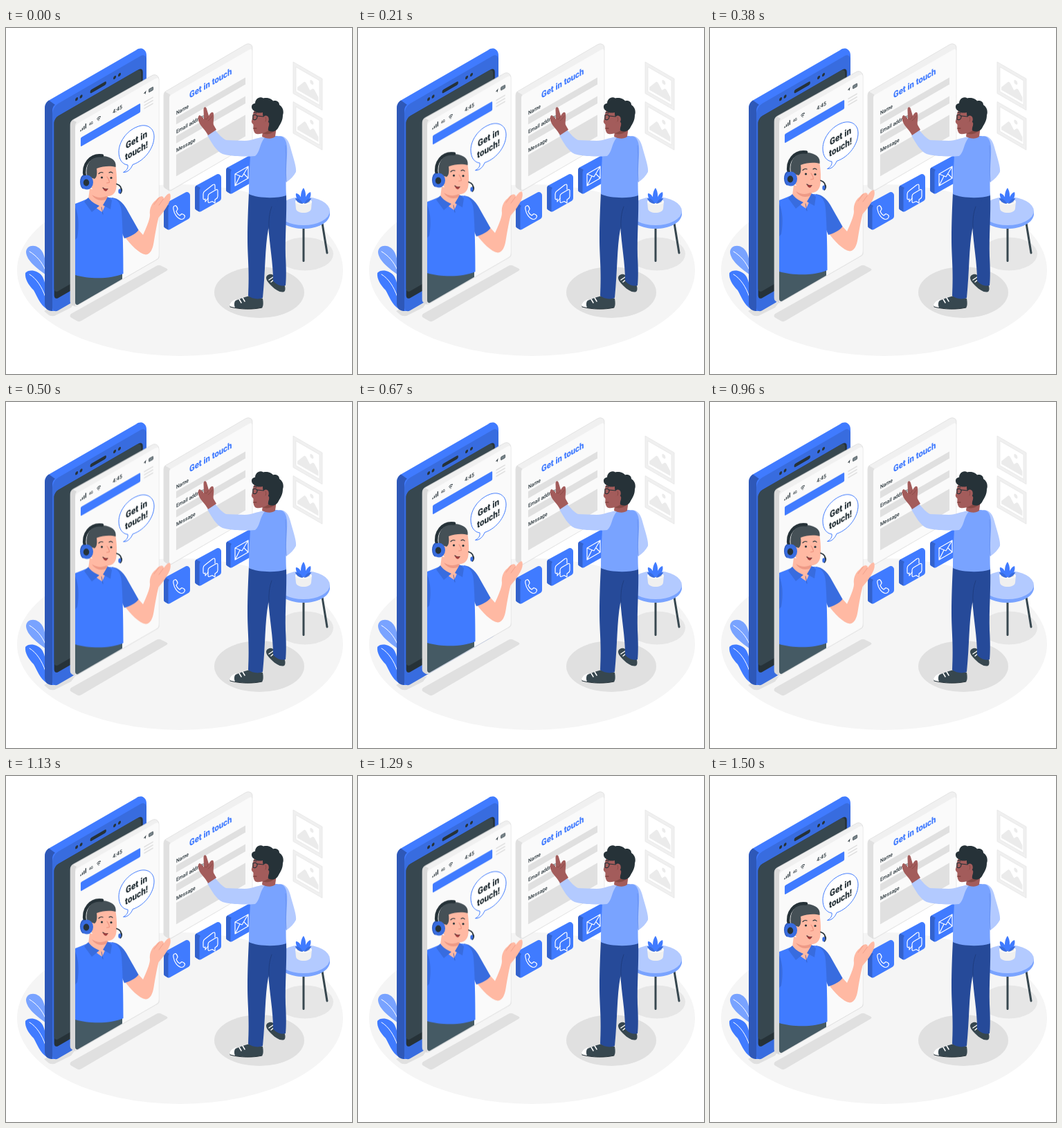
Recreate the animation shown at these times as an HTML page. Size 500 px wide and 500 px high, loop 1.54 s.

```html
<!DOCTYPE html>
<html lang="en">
<head>
<meta charset="utf-8">
<title>Get in touch</title>
<style>
  html, body { margin: 0; width: 100%; height: 100%; overflow: hidden; background: #fff; }
  svg { display: block; width: 100vw; height: 100vh; }
  text { font-family: Roboto, Inter, sans-serif; font-weight: 500; fill: #263238; }
  .bold { font-weight: 800; }
  .mid { text-anchor: middle; }
  .line { fill: none; stroke-linecap: round; stroke-linejoin: round; }
  .blue { fill: #407bff; }
  .deep { fill: #386cdf; }
  .pale { fill: #b3caff; }
  .dark { fill: #263238; }
  .slate { fill: #37474f; }
  .skin { fill: #ffb9a3; }
  .brown { fill: #a35c5b; }
  .shade { fill: #e0e0e0; }
  .float { animation: float 1540ms linear infinite; }
  @keyframes float {
    0%, 97.4%, 100% { transform: translateY(0); }
    48.7% { transform: translateY(-10px); }
  }
</style>
</head>
<body>
<svg viewBox="0 0 500 500">
  <defs>
    <clipPath id="cut"><path d="M100 0H300V286.5L104 399.7Q100 401 100 396Z"/></clipPath>
    <g id="tile">
      <path class="blue" d="M228 258Q228 254.500 231 253L260 237.300Q262 236.500 263.500 237.500L265 239Q266 240 266 242V272Q266 274.500 264 275.700L237 291Q235 292 233 291L230 289Q228 288 228 286Z"/>
      <path d="M228 258Q228 254.500 230 253.500L236 257Q234.500 258.500 234.500 261V291.500L230 289Q228 288 228 286Z" fill="#3362cc"/>
    </g>
    <g id="frame">
      <path d="M0 0H48.500V45.500H0Z" fill="#f0f0f0" stroke="#e8e8e8" stroke-width=".8"/>
      <path d="M4.500 5H44V40.500H4.500Z" fill="#fff" stroke="#e8e8e8" stroke-width=".8"/>
      <path d="M7 37V33L18 20Q20 18 22 20L28 27L32 23Q34 21 36 23L42 30V37Z" fill="#ebebeb"/>
      <circle cx="31" cy="14" r="3" fill="#ebebeb"/>
    </g>
  </defs>

  <ellipse cx="251.500" cy="350" rx="235.500" ry="124" fill="#f5f5f5"/>
  <use href="#frame" transform="matrix(.866 .5 0 1 415 49)"/>
  <use href="#frame" transform="matrix(.866 .5 0 1 415 106.500)"/>

  <g class="shade">
    <path d="M55 409L63 405L100 396L94 404L70 416Q66 417 62 415Z"/>
    <path d="M94 413L218 343.500Q221 342 224 343.500L232 347.500Q235 349 232 351L109 423Q106 425 103 423.500L94 418.500Q91 416 94 413Z"/>
    <ellipse cx="366" cy="382" rx="65" ry="37"/>
    <ellipse cx="432" cy="326.500" rx="41" ry="24" fill="#e6e6e6"/>
  </g>

  <!-- plant -->
  <path d="M58 357C46 348 30 337 29 324C29 314 41 312 48 318C55 324 58 334 58 357Z" fill="#79a3ff"/>
  <path class="blue" d="M60 407C48 399 45 387 40 379C32 371 27 362 28 354C33 348 45 350 51 357C57 364 59 380 60 407Z"/>
  <path class="line" d="M34 323C44 329 52 338 57 350M34 356C44 362 52 374 57 389" stroke="#fff" stroke-width="1"/>

  <!-- phone -->
  <path class="blue" d="M56 117C56 111 58 107 63 104L188 32C192 29 196 29 199 31C202 33 203 36 203 40V330L74 408C68 411 56 408 56 398Z"/>
  <path d="M56 117C56 111 58 107 62 104.500L71 111C68 113 67 116 67 121V409C60 409 56 405 56 398Z" fill="#2e58b8"/>
  <g transform="matrix(.866 -.5 0 1 67 114)">
    <rect class="deep" width="157" height="299" rx="10"/>
    <rect class="dark" x="3" y="18" width="148" height="263" rx="7"/>
    <rect class="slate" x="3" y="18" width="145" height="253" rx="7"/>
    <g class="dark">
      <circle cx="40.500" cy="9" r="2.300"/>
      <circle cx="48" cy="9" r="2.300"/>
      <rect x="63" y="7.500" width="27" height="5" rx="2.500"/>
      <circle cx="104" cy="9.500" r="2.300"/>
      <circle cx="112" cy="9.500" r="2.300"/>
    </g>
  </g>

  <!-- form -->
  <path d="M228 97Q228 94 230 92L347 23.500Q350 22 353 23.500Q356 25 356 28V166L239 234.500Q237 235.500 235 234.500L230 231.500Q228 230 228 228Z" fill="#f0f0f0" stroke="#dcdcdc" stroke-width=".7"/>
  <path d="M228 97Q228 94 230 92L237.500 96.500Q236 98 236 101V235L230 231.500Q228 230 228 228Z" fill="#e0e0e0"/>
  <g transform="matrix(.866 -.5 0 1 236 98)">
    <rect width="138" height="137" rx="4" fill="#fafafa"/>
    <g class="shade">
      <rect x="11.500" y="37" width="115.500" height="10"/>
      <rect x="11.500" y="64" width="115.500" height="10.500"/>
      <rect x="11.500" y="91" width="115.500" height="31"/>
    </g>
    <text class="bold" x="33.500" y="20.500" font-size="13" style="fill:#407bff">Get in touch</text>
    <g font-size="7.800">
      <text x="11.500" y="33.500">Name</text>
      <text x="11.500" y="60.500">Email address</text>
      <text x="11.500" y="87.500">Message</text>
    </g>
  </g>

  <!-- contact tiles -->
  <use href="#tile"/>
  <use href="#tile" x="45" y="-26"/>
  <use href="#tile" x="90" y="-52"/>
  <g class="line" stroke="#fff" stroke-width="1.200">
    <path d="M242 262C241 258 243 257 245 256.500C247 258 248 260 248 262L246 265C247 268 249 270 251 271L254 268.500C256 269 258 270 258.500 272C258 275 256 276.500 253 276.500C247 275 243 268 242 262Z"/>
    <path d="M292 246L288 251V247L287 247.500Q285 248.500 285 246V240Q285 237 287.500 235.500L299 226.500Q302 225 302 228V233"/>
    <path d="M292 243Q292 240.500 294.500 239L303 234Q306 232.500 306 235V243Q306 245.500 303.500 247L302 248V253L298 250.500L294.500 252Q292 253 292 250.500Z"/>
    <path d="M331 211L350 200V217L331 228ZM331 211L341 215L350 200M331 228L338 214M350 217L344 211"/>
  </g>

  <!-- floating screen -->
  <g class="float">
    <path d="M93 141C93 137 94 134.500 97 132.500L212 68.200C216 66.500 221 69 221 75V331Q221 333 219 334L102 401.500Q100 402.500 98 401.500L95 399.500Q93 398 93 395Z" fill="#f0f0f0" stroke="#d6d6d6" stroke-width=".7"/>
    <path d="M93 141C93 137 94 134.500 96.500 133L102 136Q100 138 100 142V402L95 399.500Q93 398 93 395Z" fill="#d9d9d9"/>
    <g transform="matrix(.866 -.5 0 1 100 140)">
      <rect width="139.500" height="262" rx="5" fill="#fafafa"/>
      <rect class="blue" x="9.200" y="23" width="99.500" height="13" rx="1.500"/>
      <path class="dark" d="M8.500 12H10V14H8.500ZM11.300 10.500H12.800V14H11.300ZM14.100 9H15.600V14H14.100ZM16.900 7H18.400V14H16.900Z"/>
      <text x="23" y="13" font-size="5.500">4G</text>
      <text class="mid" x="70.500" y="15.500" font-size="8">4:45</text>
      <path class="line" d="M36.300 9.500Q39.300 7 42.300 9.500M37.500 11.500Q39.300 10 41.100 11.500M39.100 13.300H39.500" stroke="#263238" stroke-width="1"/>
      <path class="dark" d="M114 12L118.500 9.500L117 14.500L116.200 12.300Z"/>
      <rect x="123" y="10" width="7" height="4.500" rx=".8" fill="#78858b" stroke="#263238" stroke-width=".6"/>
      <path class="line" d="M115.500 25H129.500M115.500 29.500H129.500M115.500 34H129.500" stroke="#dcdcdc" stroke-width="1.500"/>
    </g>

    <path d="M214 157C214 144 203 137 189 143C174 149 163 165 163 179C163 190 168 197 176 198C177 203 173 207 169.500 208.500C176 209 181 203 183 197.500C202 191 214 172 214 157Z" fill="#fff" stroke="#407bff"/>
    <g class="mid" font-size="13.500">
      <text class="bold" transform="matrix(.866 -.5 0 1 188.500 166)">Get in</text>
      <text class="bold" transform="matrix(.866 -.5 0 1 188.500 182)">touch!</text>
    </g>

    <g clip-path="url(#cut)">
      <path d="M100 350H168V370L100 410Z" fill="#455a64"/>
      <path class="skin" d="M171 301C180 313 192 326 202 327.500C209 327 212 319 213.500 310C215.500 298 218 283 220.500 274C226 268 230 262 233 257C237 251 239 244 237 239.500C234 238 231 243 227.500 247C229 244 225 242 222 244C217 247 217 249 214 251C210 255 207 262 208 270C208 277 202 290 198 299L189 289Z"/>
      <path class="line" d="M227.500 247L221 256M221.500 245L214 255" stroke="#ee9a86" stroke-width=".8"/>
      <path class="deep" d="M153 245C163 246 169 253 174 261L191.500 292C187 298 178 302 171 304L165 290Z"/>
      <path class="blue" d="M100 254C107 251 114 249 119 246L150 245C160 246 166 252 167 266C169 292 169.500 326 169.500 355C152 363 120 363 100 357Z"/>
      <path class="deep" d="M100 259C105 270 106 285 103 303L100 306Z"/>
      <path class="skin" d="M121 232L147 239L146 250L139 266C131 261 123 254 119 247Z"/>
      <path d="M124 241C132 246 139 246 147 242L146 247C138 251 129 249 124 241Z" fill="#ee9a86"/>
      <path class="deep" d="M119 245L113 251L124 266L135 257C128 254 122 250 119 245ZM147 244L153 249L151 262L140 256Z"/>
      <path class="line" d="M138 259L140 269" stroke="#2f5bbd" stroke-width=".8"/>
      <path class="skin" d="M122 205C130 195 150 193 158 198C160 209 161 224 159 233C157 241 151 244 144 243C134 242 125 237 122 227Z"/>
      <path d="M117 214C114 196 124 184 140 185C153 186 160 192 158.500 201C152 199 141 199 131 203C132 211 131 216 128 218L122 216Z" fill="#455056"/>
      <path class="line" d="M114 215C110 197 122 182 139 184.500" stroke="#263238" stroke-width="4.500"/>
      <path class="line" d="M134 210.500Q137 207.500 140 209M149 209Q152 207 154 209.500M140 231Q143 234 147 232.500" stroke="#263238" stroke-width="1.200"/>
      <circle class="dark" cx="138.500" cy="216" r="1.600"/>
      <circle class="dark" cx="152" cy="216.500" r="1.600"/>
      <path class="line" d="M146 215C148 218 150 222 149 223.500L145.500 224" stroke="#eb8f7b" stroke-width="1.100"/>
      <path d="M140 231Q143 233 147 232.500Q146 236.500 143 235.500Q140.500 234 140 231Z" fill="#a13d3d"/>
      <ellipse cx="112" cy="222.500" rx="5" ry="10" fill="#2f5bbd"/>
      <ellipse class="deep" cx="117" cy="223" rx="9" ry="10.500"/>
      <ellipse class="dark" cx="116" cy="223.500" rx="4.200" ry="5"/>
      <path class="line" d="M160 225.500Q168 228 166 236" stroke="#263238" stroke-width="1.800"/>
      <ellipse class="deep" cx="164.500" cy="236" rx="2.200" ry="3.400"/>
      <path class="line" d="M167 232Q168.500 236 165.500 239" stroke="#263238" stroke-width="1.200"/>
    </g>
  </g>

  <!-- side table -->
  <path class="line" d="M430 288V336.500M457 282L464 325" stroke="#37474f" stroke-width="3"/>
  <path d="M392 264V270C394 282 410 290 430 290S466 282 468 270V264Z" fill="#79a3ff"/>
  <ellipse class="pale" cx="430" cy="264.500" rx="38" ry="20.500"/>
  <path d="M418 251L419 261C420 269 440 269 441 261L442 251Z" fill="#f0f0f0"/>
  <ellipse cx="430" cy="251" rx="12" ry="4.500" fill="#fafafa"/>
  <ellipse cx="430" cy="251" rx="9.500" ry="3" fill="#e0e0e0"/>
  <path class="blue" d="M429 253C424 246 426 236 430 231C434 237 434 246 431 253ZM428 253C421 250 418 243 419 239C424 239 428 246 429 253ZM431 253C431 245 436 238 440 237C442 243 438 250 431 253Z"/>
  <path class="deep" d="M428 254C423 253 419 250 418 246C423 246 427 249 429 254ZM431 254C433 249 437 246 441 246C440 250 436 253 431 254Z"/>

  <!-- visitor -->
  <path class="slate" d="M376 361C376 357 382 354 386 357L390 366L402 370C404 375 404 379 402 381C397 383 390 379 384 373C380 369 376 365 376 361Z"/>
  <path class="line" d="M380 364L386 360M383 367L388 363" stroke="#fff" stroke-width="1.500"/>
  <path d="M372 242L405 240C406 270 403 300 404 330C405 348 405 362 404 372C398 374 390 371 386 365C386 340 381 315 379 285Z" fill="#264a99"/>
  <path class="slate" d="M323 402C325 395 338 391 352 387L371 391C372 397 372 402 370 404C358 407 335 407 323 402Z"/>
  <path d="M323 401C324 396 329 393 333 392C330 395 329 399 331 404C327 404 324 403 323 401Z" fill="#fff"/>
  <path class="line" d="M337 392L340 397M342 390L345 395" stroke="#fff" stroke-width="1.500"/>
  <path class="line" d="M324 403C338 407 358 407 370 404" stroke="#263238" stroke-width="1"/>
  <path d="M351 238L396 241C388 262 382 276 379 291C374 318 375 350 371 390C364 393 355 391 350 387C352 350 349 330 349 305C349 282 350 258 351 238Z" fill="#264a99"/>
  <path class="line" d="M380 290Q379 270 384 258" stroke="#1f3d80" stroke-width="1"/>

  <path class="pale" d="M395 156C405 156 409 163 412 176C416 190 420 202 419 208C416 214 411 219 405 223L398 200Z"/>
  <path d="M366 159C376 156 390 155 399 157C405 160 407 169 406 184C405 200 404 222 405 242C390 247 364 246 351 240C351 220 352 204 353 184Z" fill="#79a3ff"/>
  <path class="line" d="M404 170C406 188 403 204 405 222" stroke="#6690ee" stroke-width=".8"/>
  <path class="pale" d="M374 158C362 158 355 163 345 163C335 163 326 162 318 162C312 159 307 153 302 147L291 155C297 166 304 178 313 182C327 186 347 186 360 185C367 180 366 168 374 158Z"/>
  <path class="brown" d="M292 155C288 147 281 142 279 136C277 132 277 127 280 126C283 128 285 130 286 132L285.500 118C285.500 113.500 289 113 290 117L293 127C296 121 300 120 300 125C301 131 299 136 300 140L304 147Z"/>
  <path class="line" d="M287 131Q291 134 292 128M292 134Q296 132 298 127" stroke="#874944" stroke-width=".8"/>

  <path class="brown" d="M372 140L391 142L389 157C384 161 376 160 370 157Z"/>
  <path class="brown" d="M359 119C356 124 357 129 355 134C354 137 357 138 357.500 140C357 146 358 152 362 153C369 154 378 151 383 144L386 122Z"/>
  <path d="M371 152C378 150 383 146 386 142L388 149C383 153 377 155 371 152Z" fill="#874944"/>
  <path class="dark" d="M359 120C353 117 354 109 360 109C360 103 366 98 372 101.500C377 100 384 102 386 105.500C391 104 395 107 395 111C400 114 402 120 400 126C400 133 397 138 394 143C391 150 384 151 379 148C378 144 381 141 380 137L373 129C371 128 371 125 371 122C367 123 362 123 359 120Z"/>
  <ellipse class="brown" cx="375.500" cy="132" rx="4.300" ry="5.500"/>
  <path class="line" d="M375 129Q377 132 375 135" stroke="#874944" stroke-width=".9"/>
  <path class="line" d="M372 128L363 127M357 126Q363 124 363 129Q362 134 357 132ZM358 122L362 123" stroke="#263238" stroke-width="1.200"/>
  <path class="line" d="M357.500 145L362 145" stroke="#6f3531" stroke-width="1"/>
</svg>
</body>
</html>
```
